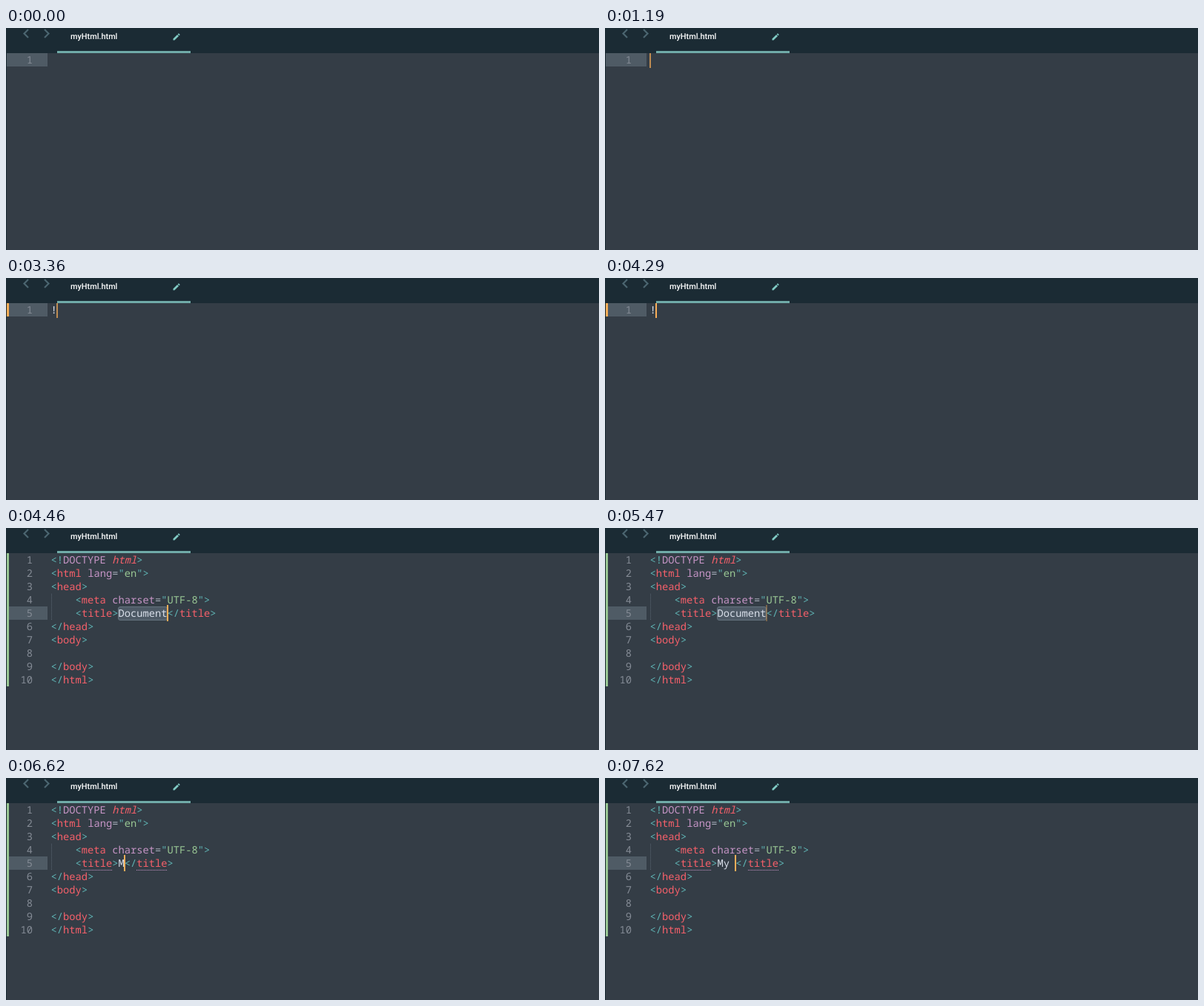
Animation, 800 px wide and 300 px high, one loop 8000 ms. Source, as an HTML page:

```html
<!DOCTYPE html>
<html lang="en">
<head>
<meta charset="UTF-8">
<title>Editor</title>
<style>
html, body { margin: 0; width: 100%; height: 100%; overflow: hidden; background: #1b2b34; }
#stage { position: relative; width: 800px; height: 300px; overflow: hidden; background: #1b2b34; }
#stage svg { position: absolute; left: 0; top: 0; }
.tab { position: absolute; left: 69px; top: 31px; width: 180px; height: 3px; background: #70aba8; }
.name { position: absolute; left: 87px; top: 4px; font: 500 10.9px/15px Roboto, sans-serif; color: #fff; text-rendering: geometricPrecision; }

#editor { position: absolute; left: 1px; top: 34px; width: 799px; height: 266px; overflow: hidden;
  background: #343d46; color: #d8dee9; font: 500 13.75px/18px "Noto Sans Mono", monospace; text-rendering: geometricPrecision; }
#editor > *, .doc > * { position: absolute; }
.row { left: 0; top: 0; width: 55px; height: 18px; background: #4f5b65; animation: row 8s step-end infinite; }
.mark { left: 0; top: 0; width: 3px; }
.nums { left: 0; top: 1px; width: 35px; text-align: right; white-space: pre; color: #848b95; }
.code { left: 59.6px; top: 1px; white-space: pre; }
.l5 { top: 73px; }
.doc { left: 0; top: 0; }
.guide { left: 60px; top: 54px; width: 1px; height: 36px; background: repeating-linear-gradient(transparent 0 1px, #596570 1px 2px); }
.box { left: 150px; top: 72px; width: 67px; height: 19px; box-sizing: border-box; border: 1px solid #65737e; border-radius: 3px; background: #4e5a66; }
.caret { top: -2px; width: 2px; height: 22px; background: #f9ae58;
  animation: move 8s step-end infinite, blink 8s step-end infinite; }

p { display: inline; margin: 0; color: #5fb4b4; }
b { font-weight: inherit; color: #f6606a; }
b.it { font-style: italic; }
u { text-decoration: none; color: #c695c6; }
s { text-decoration: none; color: #99c794; }
q { quotes: none; color: #a6acb9; }
.typed b { display: inline-block; position: relative; height: 18px; vertical-align: top; }
.typed b::after { content: ""; position: absolute; left: 0; right: 0; top: 17px; height: 1px;
  background: repeating-linear-gradient(90deg, #c695c6 0 1px, transparent 1px 2px); }

.bang { animation: bang 8s step-end infinite; }
.full { animation: full 8s step-end infinite; }
.sel { animation: sel 8s step-end infinite; }
.t1 { animation: t1 8s step-end infinite; }
.t2 { animation: t2 8s step-end infinite; }
.t3 { animation: t3 8s step-end infinite; }

@keyframes bang { 0%, 55.75%, 100% { visibility: hidden } 37.125% { visibility: visible } }
@keyframes full { 0% { visibility: hidden } 55.75%, 100% { visibility: visible } }
@keyframes sel { 0%, 82.75%, 100% { visibility: hidden } 55.75% { visibility: visible } }
@keyframes t1 { 0%, 92.25%, 100% { visibility: hidden } 82.75% { visibility: visible } }
@keyframes t2 { 0%, 95.25%, 100% { visibility: hidden } 92.25% { visibility: visible } }
@keyframes t3 { 0% { visibility: hidden } 95.25%, 100% { visibility: visible } }
@keyframes row { 0% { top: 0 } 55.75%, 100% { top: 72px } }
@keyframes move {
  0% { left: 59px; top: -2px }
  37.125% { left: 67px; top: -2px }
  55.75% { left: 216px; top: 70px }
  82.75% { left: 158px; top: 70px }
  92.25% { left: 166px; top: 70px }
  95.25%, 100% { left: 174px; top: 70px }
}
@keyframes blink {
  0%, 17%, 29.5%, 43.875%, 62.5%, 75.125%, 90.25% { opacity: 0 }
  16%, 22.75%, 43%, 50.75%, 61.625%, 68.375%, 88.375% { opacity: .35 }
  28.5%, 36.125%, 73.375%, 81.75% { opacity: .5 }
  14.875%, 23.75%, 42%, 51.875%, 60.625%, 69.375%, 87.375% { opacity: .7 }
  10.125%, 24.625%, 37.125%, 53.625%, 55.75%, 71.25%, 82.75%, 92.25%, 100% { opacity: 1 }
}
</style>
</head>
<body>
<div id="stage">
  <svg width="800" height="34">
    <path d="M30 2L24.5 7.5L30 13M52 2L57.5 7.5L52 13" fill="none" stroke="#4b6570" stroke-width="2.2"/>
    <path d="M225.5 14.6V16.5H227.4L233 10.9L231.1 9ZM231.7 8.4L233.6 10.3L234.5 9.4Q234.8 9 234.5 8.7L233.3 7.5Q233 7.2 232.6 7.5Z" fill="#80cbc4"/>
  </svg>
  <div class="name">myHtml.html</div>
  <div class="tab"></div>

  <div id="editor">
    <div class="row"></div>
    <div class="nums">1</div>
    <div class="mark bang" style="height:18px;background:#f9ae58"></div>
    <div class="code bang">!</div>

    <div class="doc full">
      <div class="mark" style="height:180px;background:#99c794"></div>
      <div class="nums">
2
3
4
5
6
7
8
9
10</div>
      <div class="guide"></div>
      <div class="box sel"></div>
      <div class="code"><p>&lt;!<u>DOCTYPE</u> <b class="it">html</b>&gt;
&lt;<b>html</b> <u>lang</u><q>=</q>"<s>en</s>"&gt;
&lt;<b>head</b>&gt;
    &lt;<b>meta</b> <u>charset</u><q>=</q>"<s>UTF-8</s>"&gt;

&lt;/<b>head</b>&gt;
&lt;<b>body</b>&gt;

&lt;/<b>body</b>&gt;
&lt;/<b>html</b>&gt;</p></div>
      <div class="code l5 sel">    <p>&lt;<b>title</b>&gt;</p>Document<p>&lt;/<b>title</b>&gt;</p></div>
      <div class="code l5 typed t1">    <p>&lt;<b>title</b>&gt;</p>M<p>&lt;/<b>title</b>&gt;</p></div>
      <div class="code l5 typed t2">    <p>&lt;<b>title</b>&gt;</p>My<p>&lt;/<b>title</b>&gt;</p></div>
      <div class="code l5 typed t3">    <p>&lt;<b>title</b>&gt;</p>My <p>&lt;/<b>title</b>&gt;</p></div>
    </div>
    <div class="caret"></div>
  </div>
</div>
</body>
</html>
```
